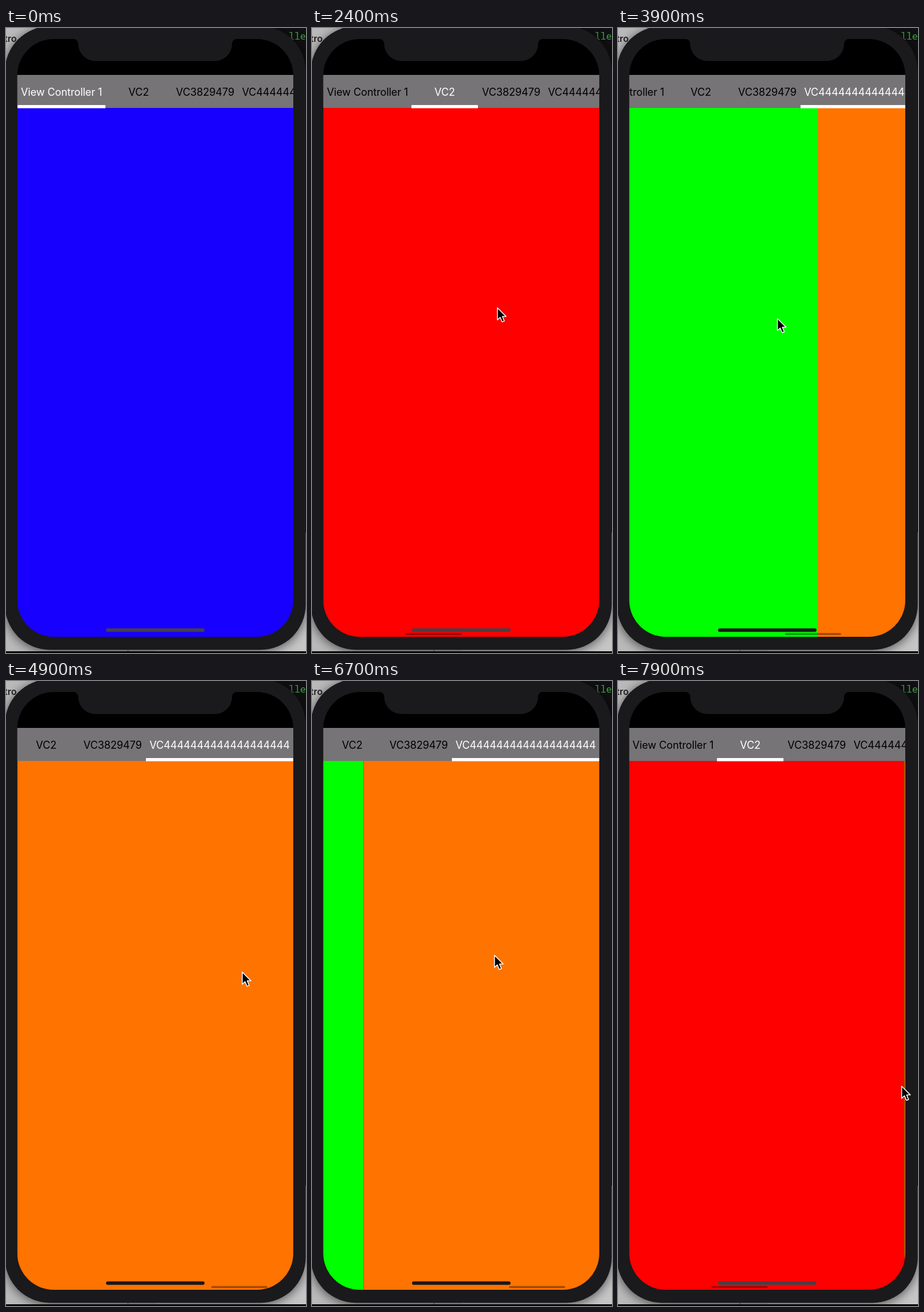
Recreate the animation shown at these times as an HTML page. Size 519 by 1079 pixels, loop 8000 ms.

```html
<!DOCTYPE html>
<html lang="en">
<head>
<meta charset="utf-8">
<title>Paged tabs</title>
<style>
  html, body { margin: 0; width: 100%; height: 100%; overflow: hidden; background: #000; }
  svg { display: block; width: 519px; height: 1079px; }
  .tab { font: 400 18px Inter, Roboto, sans-serif; letter-spacing: -0.15px; text-anchor: middle; }
  .body { filter: drop-shadow(0 3px 9px rgba(0, 0, 0, .6)); }
</style>
</head>
<body>
<svg viewBox="0 0 519 1079">
  <defs>
    <clipPath id="screen"><rect x="19.5" y="19" width="477.5" height="1032" rx="63"/></clipPath>
  </defs>

  <!-- desktop behind the phone -->
  <rect width="260" height="1076" fill="#bababa"/>
  <rect x="260" width="259" height="871" fill="#101013"/>
  <rect x="260" y="871" width="259" height="205" fill="#c6c6c6"/>
  <text x="-3" y="24" font-family="Inter, sans-serif" font-size="16" font-weight="600" fill="#202020">tro</text>
  <text x="489" y="20" font-family="Noto Sans Mono, monospace" font-size="16.5" fill="#3fa83f">lle</text>

  <rect class="body" x="-2" y="-3" width="520.5" height="1076.5" rx="78" fill="#1a191c"/>
  <path d="M211 1073.5v2.5" stroke="#333"/>
  <rect y="1076" width="519" height="3" fill="#060606"/>

  <g clip-path="url(#screen)">
    <rect x="19" y="19" width="479" height="63" fill="#000"/>
    <g id="pages"></g>
    <rect x="19" y="81" width="479" height="57" fill="#767477"/>
    <g id="bar">
      <rect id="line" y="133" height="5.5" fill="#fff"/>
    </g>
    <rect id="thumb" y="1044.5" width="97" height="3.5" rx="1.75" fill="#000" fill-opacity=".36"/>
    <rect id="home" x="173" y="1036.5" width="170.5" height="6" rx="3"/>
  </g>
  <path d="M115 18.5Q125 19 125 28A30 29 0 0 0 155 57H361A30 29 0 0 0 391 28Q391 19 401 18.5Z" fill="#1a191c"/>

  <path id="cursor" d="M.7 1.5V22.5L5.5 18L9 26L12.7 24.5L9.4 16.6H15.8Z"
        fill="#000" stroke="#fff" stroke-width="1.5" stroke-linejoin="round"/>
</svg>
<script>
const LOOP = 8000, STEP = 100, SETTLE = 580;
const LEFT = 19.5, WIDTH = 477.5, RIGHT = LEFT + WIDTH;
const COLORS = ['#1800ff', '#ff0000', '#00ff00', '#ff7300'];
const TABS = [
  { name: 'View Controller 1', w: 152 },
  { name: 'VC2', w: 115 },
  { name: 'VC3829479', w: 115 },
  { name: 'VC' + '4'.repeat(19), w: 255 }
];
// pointer stops: time, x, y; a fourth value marks a drag released there and the page it leads to
const STOPS = [
  [300, 490, 698], [600, 490, 698], [1100, 309, 495], [1500, 309, 495],
  [1800, 140, 490, 1], [2500, 350, 480], [2800, 180, 495, 2],
  [3600, 426, 500], [3900, 275, 500, 3], [4900, 408, 501],
  [6500, 245, 472], [6800, 350, 472, 2], [7300, 280, 472], [7400, 390, 470, 1], [7900, 433, 463]
];

const $ = id => document.getElementById(id);
const mix = (a, b, u) => a + (b - a) * u;
const clamp = (v, lo = 0, hi = 1) => Math.min(hi, Math.max(lo, v));
const easeOut = (u, power) => 1 - (1 - clamp(u)) ** power;

function add(parent, tag, attrs) {
  const el = document.createElementNS('http://www.w3.org/2000/svg', tag);
  set(el, attrs);
  return parent.appendChild(el);
}
function set(el, attrs) {
  for (const key in attrs) el.setAttribute(key, attrs[key]);
}

COLORS.forEach((fill, i) => add($('pages'), 'rect', {
  x: LEFT + i * WIDTH, y: 138, width: WIDTH, height: 915, fill
}));

// lay the tabs out in a row; a chosen tab is scrolled to the middle where possible
let end = 20;
for (const tab of TABS) {
  tab.x = end;
  end += tab.w;
  tab.mid = tab.x + tab.w / 2;
  tab.label = add($('bar'), 'text', { class: 'tab', x: tab.mid, y: 116.5 });
  tab.label.textContent = tab.name;
}
for (const tab of TABS) tab.scroll = clamp(tab.mid - (LEFT + RIGHT) / 2, 0, end - RIGHT);

function pointer(t) {
  const i = clamp(STOPS.findIndex(stop => stop[0] > t), 1, STOPS.length - 1);
  const [a, b] = [STOPS[i - 1], STOPS[i]];
  const u = clamp((t - a[0]) / (b[0] - a[0]));
  return [mix(a[1], b[1], u), mix(a[2], b[2], u)];
}

function state(t) {
  const s = { page: 0, tab: 0, scroll: 0, thumb: 0 };
  STOPS.forEach(([release, , , to], i) => {
    if (!to || t <= STOPS[i - 1][0]) return;
    const [start, grab] = STOPS[i - 1];
    const u = (t - release) / SETTLE;
    s.page = mix(s.page - (pointer(Math.min(t, release))[0] - grab) / WIDTH, to, easeOut(u, 3));
    s.thumb = 1 - clamp((t - release - 1100) / 300);
    if (t >= release) {
      s.scroll = mix(TABS[s.tab].scroll, TABS[to].scroll, easeOut(u, 2.4));
      s.tab = to;
    }
  });
  return s;
}

function draw(t) {
  const s = state(t), [x, y] = pointer(t), { x: left, w: width } = TABS[s.tab];
  const dark = clamp(s.page - 1);
  set($('pages'), { transform: `translate(${-s.page * WIDTH} 0)` });
  set($('bar'), { transform: `translate(${-s.scroll} 0)` });
  set($('line'), { x: left, width });
  TABS.forEach((tab, i) => set(tab.label, { fill: i === s.tab ? '#fff' : '#000' }));
  set($('thumb'), { x: 65 + s.page * 96.7, opacity: s.thumb });
  set($('home'), { fill: `rgb(${[70, 64, 70].map(c => Math.round(mix(c, 24, dark)))})` });
  set($('cursor'), {
    transform: `translate(${x} ${y})`,
    visibility: t < STOPS[0][0] ? 'hidden' : 'visible'
  });
}

const begin = performance.now();
function tick() {
  const t = (performance.now() - begin) % LOOP;
  draw(Math.floor(t / STEP) * STEP);
  requestAnimationFrame(tick);
}
tick();
</script>
</body>
</html>
```
